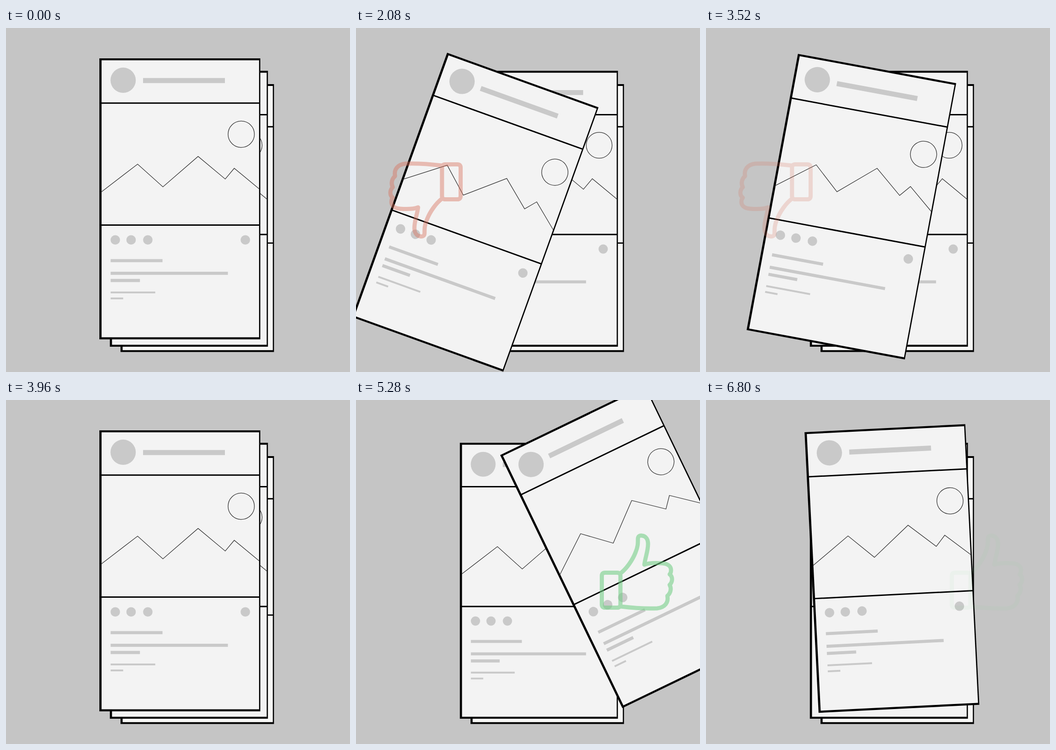
Write an HTML page that moves like this. It is 748x748 px and loops after 6.84 s.

```html
<!DOCTYPE html>
<html lang="en">
<head>
<meta charset="utf-8">
<title>Swipe cards</title>
<style>
  html, body { margin: 0; width: 100%; height: 100%; overflow: hidden; background: #c5c5c5; }
  svg { display: block; width: 100vw; height: 100vh; }
</style>
</head>
<body>
<svg viewBox="0 0 748 748">
  <defs>
    <g id="frame">
      <path d="M203 66H553V677H203Z"/>
      <path d="M207.8 70.3H550.3V672.6H207.8Z" fill="currentColor"/>
      <path d="M206 163.3H552M206 428.5H552" stroke="#000" stroke-width="3"/>
    </g>
    <g id="card">
      <use href="#frame" color="#f3f3f3"/>
      <g fill="#c9c9c9">
        <circle cx="254.7" cy="113.6" r="27.5"/>
        <circle cx="237.6" cy="460.7" r="10.3"/>
        <circle cx="272" cy="460.7" r="10.3"/>
        <circle cx="308.4" cy="460.7" r="10.3"/>
        <circle cx="520.4" cy="460.7" r="10.3"/>
        <path d="M298 108.7h178v11h-178z M227.5 502.5h112.8v6.8h-112.8z M227.5 530h255v6.8h-255z
                 M227.5 545.6h63.7v6.8h-63.7z M227.5 573h97v4h-97z M227.5 586h27.3v4h-27.3z"/>
      </g>
      <g fill="none" stroke="#333" stroke-width="1.3">
        <path d="M207 356.7L286.2 296L341.2 345.4L417.7 279.2L476.7 328.4L496.3 305L551 350.3"/>
        <circle cx="511.5" cy="231" r="28.6"/>
      </g>
    </g>
    <path id="thumb" fill="none" stroke-width="9" stroke-linejoin="round" stroke-linecap="round"
      d="M541.5 375.5H568Q575 375.5 575 382.5V444.5Q575 451.5 568 451.5H541.5Q534.5 451.5 534.5 444.5V382.5Q534.5 375.5 541.5 375.5Z
         M575 377C588 367 601 349 608 331C613 319 613 312 613 302C613 296 617 294 622 295
         C631 296 635 304 635 313C635 329 629 342 627 358C637 354 652 354 666 355
         C680 356 685 363 685 370Q685 376 682 379C689 384 689 395 682 402
         C686 409 685 419 677 426C680 440 672 451 655 453C629 454 601 452 576 449"/>
  </defs>
  <use href="#frame" color="#f8f8f6" transform="translate(249 122) scale(.9535) translate(-203 -66)"/>
  <use href="#card" transform="translate(225.8 93) scale(.982) translate(-203 -66)"/>
  <use href="#card" id="top"/>
  <use href="#thumb" id="dislike" stroke="#d6725e" transform="rotate(180 381 374)"/>
  <use href="#thumb" id="like" stroke="#72cd84"/>
</svg>
<script>
  const LOOP = 6840, STEP = 40, MAX_ANGLE = 27.75, MAX_OPACITY = 0.62;
  const [card, dislike, like] = ['top', 'dislike', 'like'].map(id => document.getElementById(id));
  const ramp = (t, start, length) => Math.min(1, Math.max(0, (t - start) / length));

  // 0 at rest, 1 fully swiped: out, hold, back
  const swipe = (t, start) => ramp(t, start, 1120) - ramp(t, start + 1520, 1160);

  function draw(now) {
    const t = Math.floor(now % LOOP / STEP) * STEP;
    const left = swipe(t, 1280), right = swipe(t, 4240);
    const shift = 212.6 * right - 116 * left;
    const angle = MAX_ANGLE * (left - right);
    card.setAttribute('transform', `translate(${shift} 0) rotate(${angle} 277 283)`);
    dislike.setAttribute('opacity', MAX_OPACITY * left);
    like.setAttribute('opacity', MAX_OPACITY * right);
  }

  const begin = performance.now();
  function tick() {
    draw(performance.now() - begin);
    requestAnimationFrame(tick);
  }
  tick();
</script>
</body>
</html>
```
